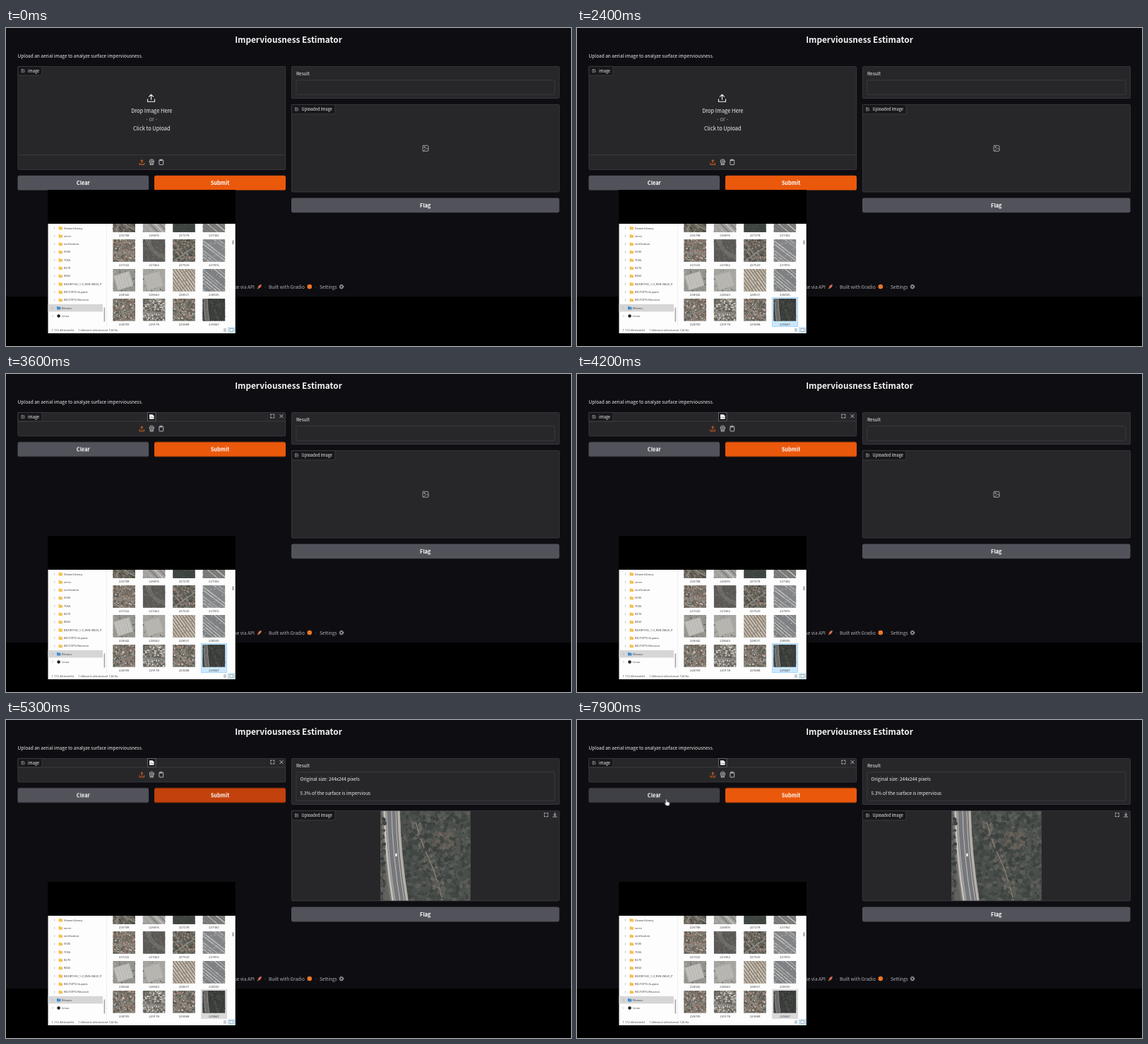
Animation of 800 by 450 pixels, one loop 8 s. Source, as an HTML page with a canvas:

```html
<!DOCTYPE html>
<html lang="en">
<head>
<meta charset="utf-8">
<title>Imperviousness Estimator</title>
<style>
html, body { margin: 0; width: 100%; height: 100%; overflow: hidden; background: #000; }
#stage { position: relative; width: 800px; height: 450px; overflow: hidden; }
#stage > * { position: absolute; left: 0; top: 0; }
svg { font-family: "Noto Sans CJK JP", "Noto Sans CJK SC", "Noto Sans CJK", "Noto Sans", sans-serif; fill: #f4f4f5; }
.mid { text-anchor: middle; }
.bold { font-weight: 700; font-size: 7.4px; text-anchor: middle; fill: #fff; }
.t65 { font-size: 6.53px; }
.t75 { font-size: 7.45px; }
.label { font-size: 5.65px; }
.foot { font-size: 6.5px; fill: #b4b4bb; }
.panel { fill: #27272a; stroke: #3f3f46; stroke-width: .8; }
.tag { fill: #18181b; stroke: #3f3f46; stroke-width: .8; }
.line { fill: none; stroke: #c8c8ce; stroke-width: .9; stroke-linecap: round; stroke-linejoin: round; }
.grey { fill: #52525b; }
.files { font: 4.1px "Noto Sans", "Open Sans", sans-serif; fill: #444; }
.num { font-size: 4.3px; text-anchor: middle; }

/* Hard changes over the 8 s loop */
.cut { animation: 8s step-end infinite; }
.empty { animation-name: until-drop; }
.loaded { animation-name: from-drop; }
.idle { animation-name: until-result; }
.done { animation-name: from-result; }
.lift { animation-name: lift; }
.submit { animation-name: submit; }
.clear { animation-name: clear; }
.pick { animation-name: pick; }
@keyframes until-drop { 0% { opacity: 1 } 43.75%, 100% { opacity: 0 } }
@keyframes from-drop { 0% { opacity: 0 } 43.75%, 100% { opacity: 1 } }
@keyframes until-result { 0% { opacity: 1 } 63.75%, 100% { opacity: 0 } }
@keyframes from-result { 0% { opacity: 0 } 63.75%, 100% { opacity: 1 } }
@keyframes lift { 0% { transform: none } 43.75%, 100% { transform: translateY(-112.6px) } }
@keyframes submit { 0% { fill: #ea580c } 53.75% { fill: #c2410c } 91.25%, 100% { fill: #ea580c } }
@keyframes clear { 0% { fill: #52525b } 91.9%, 100% { fill: #3f3f46 } }
@keyframes pick {
  0% { fill: #fff; stroke: #fff }
  25% { fill: #e5f3ff; stroke: #e5f3ff }
  28% { fill: #cce8ff; stroke: #99d1ff }
  55%, 100% { fill: #d9d9d9; stroke: #d9d9d9 }
}

/* Pointers */
.arrow { animation: arrow 8s linear infinite, arrow-on 8s step-end infinite; }
.hand { animation: hand 8s ease-in-out infinite, hand-on 8s step-end infinite; }
@keyframes arrow {
  0%, 11.25% { transform: translate(283px, 420px) }
  15%, 21% { transform: translate(275px, 384px) }
  25%, 100% { transform: translate(291px, 399px) }
}
@keyframes arrow-on { 0% { opacity: 0 } 11.25% { opacity: 1 } 29%, 100% { opacity: 0 } }
@keyframes hand {
  0%, 79% { transform: translate(238px, 108px) }
  82.5%, 90% { transform: translate(224.5px, 107px) }
  95%, 100% { transform: translate(126.5px, 112.2px) }
}
@keyframes hand-on { 0% { opacity: 0 } 79%, 100% { opacity: 1 } }
</style>
</head>
<body>
<div id="stage">
<svg width="800" height="450" viewBox="0 0 800 450">
  <defs>
    <g id="picture" class="line">
      <rect x="-4" y="-4" width="8" height="8" rx="1"/>
      <circle cx="-1.5" cy="-1.6" r=".8"/>
      <path d="M-3 4 L1.6 -.6 L4 1.8"/>
    </g>
    <path id="expand" class="line" d="M-2.5 -.9V-2.5H-.9M.9 -2.5H2.5V-.9M2.5 .9V2.5H.9M-.9 2.5H-2.5V.9"/>
    <path id="upload" d="M-5 1.5V5H5V1.5M0 2V-5M-3 -2.2L0 -5.2L3 -2.2"/>
    <g id="outtag">
      <path class="tag" d="M404.4 108.4H466V119.5Q466 121.8 463.7 121.8H404.4Z"/>
      <use href="#picture" transform="translate(411.5 115) scale(.52)"/>
      <text class="label" x="418.6" y="117.2">Uploaded Image</text>
    </g>
    <g id="flag">
      <rect class="grey" x="404" y="240.4" width="379.5" height="20.8" rx="2.6"/>
      <text class="bold" x="593.8" y="253.6">Flag</text>
    </g>
  </defs>

  <rect width="800" height="380" fill="#0e0e12"/>
  <text class="mid" x="400" y="21" font-size="11.8" font-weight="700">Imperviousness Estimator</text>
  <text class="t65" x="16.6" y="41.8">Upload an aerial image to analyze surface imperviousness.</text>

  <!-- input panel -->
  <g class="cut empty">
    <rect class="panel" x="16.9" y="54.4" width="378.8" height="146" rx="1.5"/>
    <use href="#upload" class="line" transform="translate(205.5 99.3)" style="stroke:#f4f4f5;stroke-width:1.1"/>
    <text class="t75 mid" x="206.3" y="119.6">Drop Image Here</text>
    <text class="t75 mid" x="206.3" y="132.2" fill="#a1a1aa">- or -</text>
    <text class="t75 mid" x="206.3" y="144.7">Click to Upload</text>
  </g>
  <g class="cut loaded">
    <rect class="panel" x="16.9" y="54.4" width="378.8" height="33.4" rx="1.5"/>
    <rect x="200.4" y="54.6" width="11.6" height="11.8" fill="#18181b" stroke="#71717a" stroke-width=".8"/>
    <path d="M203 57.2H207.4L209.6 59.2V63.8H203Z" fill="#fff"/>
    <path d="M203.5 62L205.2 60.6L207 62L209 61" stroke="#52525b" stroke-width=".7" fill="none"/>
    <use href="#expand" x="377.3" y="59.6"/>
    <path class="line" d="M387.8 57.4L392.2 61.8M392.2 57.4L387.8 61.8"/>
  </g>
  <path class="tag" d="M16.9 54.4H51V64.7Q51 67 48.7 67H16.9Z"/>
  <use href="#picture" transform="translate(24 60.7) scale(.52)"/>
  <text class="label" x="31" y="63">image</text>

  <g class="cut lift">
    <path d="M17.3 179.6H395.3" stroke="#3f3f46" stroke-width=".8"/>
    <use href="#upload" fill="none" stroke="#f06a1d" stroke-width="1.5" transform="translate(192.3 190) scale(.65)"/>
    <g class="line">
      <circle cx="206.3" cy="189" r="3.2"/><circle cx="206.3" cy="189" r="1.3"/>
      <path d="M204.7 192L203.9 193.4H208.7L207.9 192"/>
      <rect x="216.9" y="186.8" width="5.8" height="6.7" rx=".7"/>
      <path d="M218.5 186.2H221.1V187.6H218.5Z"/>
    </g>
    <rect class="grey cut clear" x="16.5" y="208.8" width="185.6" height="20.8" rx="2.6"/>
    <rect class="cut submit" x="210" y="208.8" width="186" height="20.8" rx="2.6" fill="#ea580c"/>
    <text class="bold" x="109.3" y="222">Clear</text>
    <text class="bold" x="303" y="222">Submit</text>
  </g>

  <!-- output panels -->
  <g class="cut idle">
    <rect class="panel" x="404.4" y="54.4" width="379" height="45" rx="1.5"/>
    <rect class="panel" x="410.9" y="73.8" width="366" height="20.4" rx="1.5"/>
    <rect class="panel" x="404.4" y="108.4" width="379" height="123.6" rx="1.5"/>
    <use href="#outtag"/>
    <use href="#picture" x="594" y="170.3" opacity=".8"/>
    <use href="#flag"/>
  </g>
  <g class="cut done">
    <rect class="panel" x="404.4" y="54.4" width="379" height="65" rx="1.5"/>
    <rect class="panel" x="410.9" y="73.8" width="366" height="40.4" rx="1.5"/>
    <text class="t65" x="416.6" y="85.5">Original size: 244x244 pixels</text>
    <text class="t65" x="416.6" y="105.9">5.3% of the surface is impervious</text>
    <rect class="panel" x="404.4" y="128.4" width="379" height="127.5" rx="1.5"/>
    <use href="#outtag" y="20"/>
    <use href="#expand" x="764.8" y="134.2"/>
    <path class="line" d="M777.2 131.2V135.3M775.4 133.6L777.2 135.4L779 133.6M774.6 137H779.8"/>
    <use href="#flag" y="24.2"/>
  </g>
  <text class="t65" x="411" y="66.5">Result</text>

  <!-- footer -->
  <g class="foot">
    <text x="352" y="368.7" text-anchor="end">Use via API</text>
    <path d="M361.8 362.8Q358 363.2 356.6 367L358.2 368.6Q361.8 367 361.8 362.8Z" fill="#d86a55"/>
    <path d="M356.8 367.4L355.6 369.6L357.8 368.4Z" fill="#f0a040"/>
    <text class="mid" x="367.2" y="368.7">·</text>
    <text x="372" y="368.7">Built with Gradio</text>
    <circle cx="429.8" cy="366" r="3.3" fill="#ee7626"/>
    <text class="mid" x="438.8" y="368.7">·</text>
    <text x="444" y="368.7">Settings</text>
    <circle cx="475" cy="366.1" r="2.6" fill="none" stroke="#9ba0a8" stroke-width="1.4" stroke-dasharray="1.4 .64"/>
    <circle cx="475" cy="366.1" r="1.7" fill="none" stroke="#9ba0a8" stroke-width="1"/>
  </g>

  <!-- file window -->
  <rect x="59" y="229" width="266" height="203" fill="#000"/>
  <rect x="59.5" y="277" width="265.2" height="155" fill="#fdfdfd"/>
  <path d="M142.5 277V423" stroke="#e8e8e8" stroke-width=".7"/>
  <rect x="59.5" y="390.8" width="77.5" height="10.6" fill="#d6d6d6"/>
  <rect x="138.6" y="395.5" width="1.6" height="20" fill="#a5a5a5"/>
  <rect x="320.8" y="300.5" width="1.3" height="5.6" fill="#777"/>
  <rect class="cut pick" x="276.4" y="381.3" width="36.2" height="41.2" stroke-width=".8" fill="#fff"/>
  <g class="files" id="files">
    <text x="64.5" y="429">1 112 élément(s)</text>
    <text x="102" y="429">1 élément sélectionné  124 Ko</text>
  </g>
  <rect x="314.6" y="424" width="9" height="6.8" fill="#d5ebfa" stroke="#8fc4ea" stroke-width=".6"/>
  <rect x="317" y="425.6" width="4.2" height="3.5" fill="#fff" stroke="#777" stroke-width=".5"/>
  <path d="M308 425.8H312M308 427.4H312M308 429H312" stroke="#777" stroke-width=".6"/>
</svg>
<canvas id="thumbs" width="800" height="450"></canvas>
<canvas id="aerial" class="cut done" width="800" height="450"></canvas>
<svg width="800" height="450" viewBox="0 0 800 450">
  <path class="arrow" d="M0 0V5.4L1.3 4.3L2.2 6.2L3 5.8L2.2 4H4Z" fill="#fff" stroke="#222" stroke-width=".5"/>
  <path class="hand" d="M-.9 .6Q0 -.6 .9 .6V3.4L4 4.2Q4.9 4.6 4.7 5.8L4.1 9H-.2L-2.7 5.6Q-2.4 4.4 -.9 5.4Z" fill="#fff" stroke="#222" stroke-width=".5"/>
</svg>
</div>
<script>
const NS = 'http://www.w3.org/2000/svg';
const files = document.getElementById('files');

function add(tag, attrs, text) {
  const el = document.createElementNS(NS, tag);
  for (const k in attrs) el.setAttribute(k, attrs[k]);
  if (text) el.textContent = text;
  files.append(el);
}

// Folder tree
const folders = ['ViewerLibrary', 'verre', 'verification', '5505', '7056', '8270', '8462',
  'BDORTHO_1-0_RVB-0M20_P', 'BD-TOPO-Guyane', 'BD-TOPO-Réunion', 'Réseau', 'Linux'];
folders.forEach((name, i) => {
  const y = 283 + i * 11.32, root = i > 9, x = root ? 72 : 74.6;
  add('path', { d: `M${x - 6.6} ${y - 1.2}l1.2 1.2l-1.2 1.2`, fill: 'none', stroke: '#888', 'stroke-width': .6 });
  if (name === 'Linux') {
    add('circle', { cx: 74.6, cy: y, r: 2.3, fill: '#222' });
  } else {
    add('path', { d: `M${x} ${y - 2.2}h2l.8 .8h2.6v3.8h-5.4z`, fill: root ? '#3f8fd0' : '#f4c04f' });
  }
  add('text', { x: root ? 79 : 82, y: y + 1.5 }, name);
});

// Seeded random numbers
let seed = 1;
const rnd = () => (seed = (seed * 16807) % 2147483647) / 2147483647;
const pick = list => list[Math.floor(rnd() * list.length)];

function stroke(c, color, width, path) {
  c.strokeStyle = color;
  c.lineWidth = width;
  c.stroke(new Path2D(path));
}

function blob(c, x, y, r, color) {
  c.fillStyle = color;
  c.beginPath();
  c.ellipse(x, y, r, r * (.7 + rnd() * .4), rnd() * 3, 0, 7);
  c.fill();
}

// Wooded land with a road, 128 units square
function woodland(c) {
  seed = 4711;
  c.fillStyle = '#4c504d';
  c.fillRect(0, 0, 128, 128);
  const greens = ['#3b413e', '#424844', '#494e4a', '#525551', '#5c5d58', '#3f4542'];
  for (let i = 0; i < 1000; i++) blob(c, rnd() * 128, rnd() * 128, 1 + rnd() * 3, pick(greens));
  c.globalAlpha = .5;
  for (let i = 0; i < 120; i++) {
    const t = rnd();
    blob(c, 48 + t * 38 + (rnd() - .5) * 16, 12 + t * 105, .7 + rnd() * 2, pick(['#7d736c', '#6d6660', '#857a73']));
    blob(c, 88 + (rnd() - .5) * 32, 42 + (rnd() - .5) * 24, .7 + rnd() * 2, pick(['#75695f', '#69635b']));
  }
  c.globalAlpha = 1;
  stroke(c, '#857d75', 1.5, 'M50 16Q58 45 66 62T78 92T88 127');
  for (let i = 0; i < 150; i++) blob(c, 40 + rnd() * 88, rnd() * 128, 1 + rnd() * 3, pick(greens));
  const road = dx => `M${14.5 + dx} -2Q${16 + dx} 62 ${27 + dx} 130`;
  stroke(c, '#62625f', 16, road(-18));
  stroke(c, '#757470', 26, road(0));
  stroke(c, '#c3bfb8', 3, road(-9));
  stroke(c, '#b5b1aa', 3.4, road(11));
  stroke(c, '#77787b', 13, road(0));
  for (const dx of [-6, 1, 7]) stroke(c, '#d0d0ce', .8, road(dx));
  for (let i = 0; i < 70; i++) blob(c, rnd() * 6, rnd() * 128, 1 + rnd() * 2, pick(greens));
  c.fillStyle = '#fff';
  c.fillRect(21, 60, 2.2, 4.2);
}

function houses(c, tones, angle) {
  c.fillStyle = '#66655d';
  c.fillRect(0, 0, 32, 32);
  c.translate(16, 16);
  c.rotate(angle);
  for (let y = -24; y < 24; y += 2.6) {
    for (let x = -24; x < 24; x += 2.6) {
      c.fillStyle = pick(tones);
      c.fillRect(x + rnd(), y + rnd(), 1.3 + rnd() * 1.5, 1.2 + rnd() * 1.4);
    }
  }
  c.fillStyle = '#8b8985';
  c.fillRect(-24, 3, 48, 1.6);
  c.fillRect(-5, -24, 1.4, 48);
}

function stripes(c, base, tones, gap, angle) {
  c.fillStyle = base;
  c.fillRect(0, 0, 32, 32);
  c.translate(16, 16);
  c.rotate(angle);
  for (let y = -24; y < 24; y += gap) {
    c.fillStyle = pick(tones);
    c.fillRect(-24, y, 48, gap * .4);
    for (let i = 0; i < 7; i++) {
      c.fillStyle = pick(['#6c6e6e', '#cfcecb', base]);
      c.fillRect(rnd() * 48 - 24, y, 1.5, .9);
    }
  }
}

function lot(c, base, roof) {
  c.fillStyle = base;
  c.fillRect(0, 0, 32, 32);
  for (let i = 0; i < 60; i++) blob(c, rnd() * 32, rnd() * 32, .4 + rnd() * .8, pick(['#80827d', '#b8b6b0', '#93938d', '#656861']));
  c.translate(15, 15);
  c.rotate(-.3);
  c.fillStyle = roof;
  c.fillRect(-12, -9, 23, 21);
  for (let x = -11; x < 11; x += 4) {
    c.fillStyle = '#aaa8a3';
    c.fillRect(x, -9, .5, 21);
  }
}

function field(c) {
  c.fillStyle = '#3e4540';
  c.fillRect(0, 0, 32, 32);
  for (let i = 0; i < 160; i++) blob(c, rnd() * 32, rnd() * 32, .4 + rnd() * .8, pick(['#383f39', '#454c45', '#4a5049']));
}

function rails(c) {
  c.fillStyle = '#5b5a57';
  c.fillRect(0, 0, 32, 32);
  for (let i = 0; i < 170; i++) blob(c, rnd() * 32, rnd() * 32, .4 + rnd(), pick(['#50514e', '#646360', '#585854', '#6e6964']));
  for (const d of [0, 2.5, 5]) stroke(c, '#96928c', .7, `M${4 + d} 0Q${9 + d} 20 32 ${28 - d}`);
}

const brick = ['#a98573', '#b8998a', '#c9c0b8', '#595b54', '#77756c', '#93786b', '#8a8982'];
const green = ['#957566', '#4d524b', '#575b53', '#666962', '#a89084', '#44493f'];
const pale = ['#c9c5bf', '#b6afa7', '#77766f', '#dedbd6', '#968d85', '#5e605a'];
const lane = ['#c0bfbc', '#808284', '#aaaaa8'];

function wood(c) {
  c.scale(.25, .25);
  woodland(c);
  c.fillStyle = '#0003';
  c.fillRect(0, 0, 128, 128);
}

const tiles = [
  ['226708', c => houses(c, green, .5)], ['226876', c => stripes(c, '#a19f9b', lane, 5, .8)],
  ['227278', field], ['227302', c => stripes(c, '#767773', lane, 4, .7)],
  ['227222', c => houses(c, brick, .15)], ['227462', rails],
  ['227520', c => houses(c, green, -.6)], ['227816', c => stripes(c, '#85878a', lane, 3.6, .65)],
  ['228342', c => lot(c, '#96958f', '#c3c1bc')], ['228343', c => lot(c, '#a7a5a0', '#b9b7b2')],
  ['228531', c => stripes(c, '#948879', ['#d5d0c6', '#c8c0b3'], 3.6, .95)],
  ['228535', c => stripes(c, '#7e8184', lane, 3.6, .7)],
  ['228709', c => houses(c, brick, -.3)], ['229178', c => houses(c, pale, .05)],
  ['229088', c => houses(c, brick, .6)], ['229847', wood]
];

const t = document.getElementById('thumbs').getContext('2d');
t.beginPath();
t.rect(59, 277, 266, 155);
t.clip();
tiles.forEach(([name, draw], i) => {
  const x = 151.3 + i % 4 * 42.4, y = 257.2 + Math.floor(i / 4) * 41.9;
  seed = 977 + i * 3571;
  t.save();
  t.translate(x, y);
  t.beginPath();
  t.rect(0, 0, 31.7, 31.7);
  t.clip();
  draw(t);
  t.restore();
  add('text', { class: 'num', x: x + 15.9, y: y + 37.8 }, name);
});

const a = document.getElementById('aerial').getContext('2d');
a.translate(530.3, 128.8);
a.beginPath();
a.rect(0, 0, 127.4, 126.8);
a.clip();
woodland(a);
</script>
</body>
</html>
```
